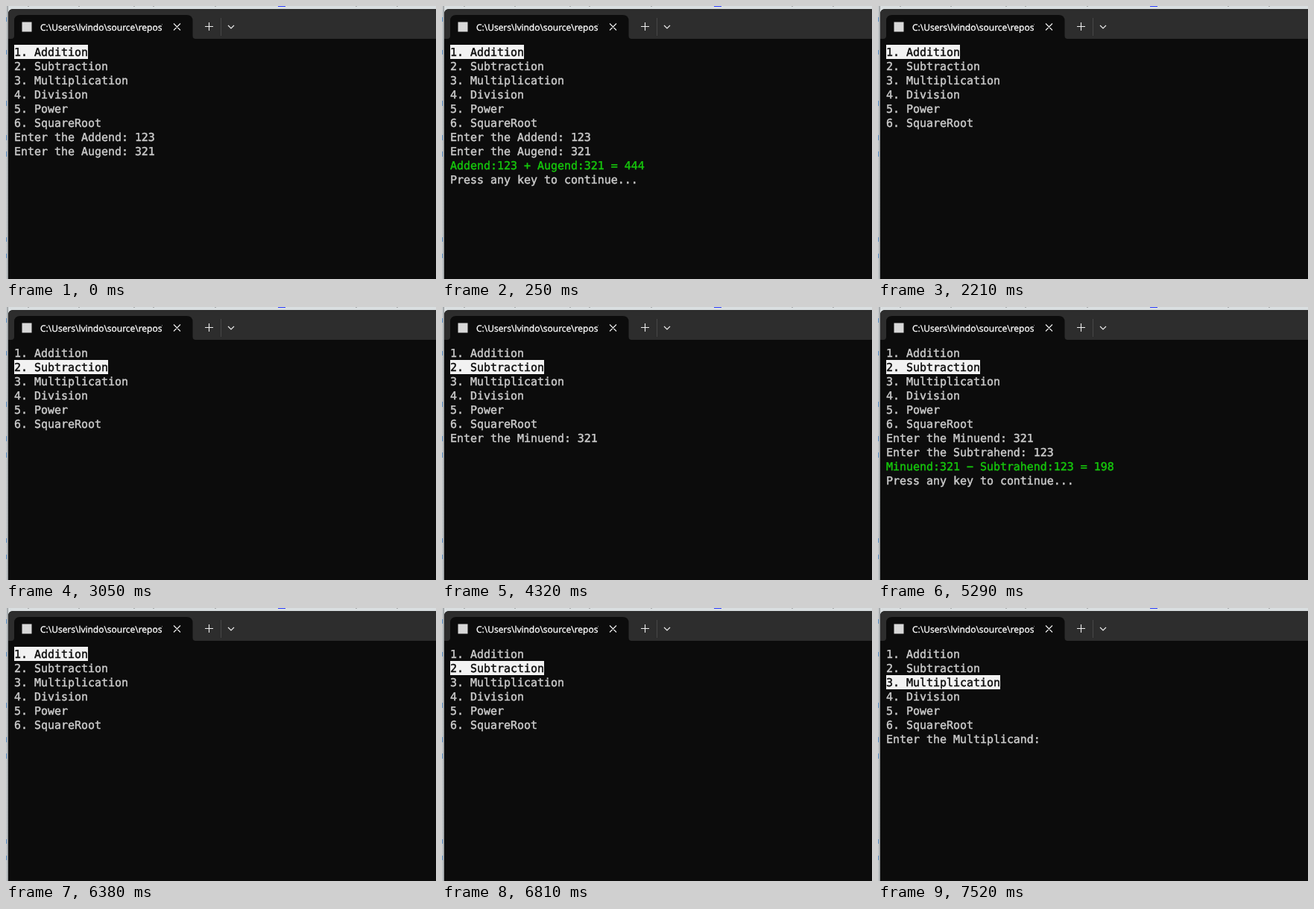
These frames come from a looping animation (577 px wide and 366 px high, 8 s). An HTML page:

```html
<!DOCTYPE html>
<html lang="en">
<head>
<meta charset="utf-8">
<title>Calculator menu</title>
<style>
  html, body { margin: 0; width: 100%; height: 100%; overflow: hidden; background: #0c0c0c; }
  svg { display: block; }
  text { fill: currentColor; stroke: currentColor; stroke-width: .45; text-rendering: geometricPrecision; }
  .title { font: 12px "Open Sans", "Noto Sans", sans-serif; color: #fff; stroke-width: .35; }
  #screen { font: 14.95px "DejaVu Sans Mono", "Noto Sans Mono", monospace; }
  .icon { fill: none; stroke: #eee; stroke-width: 1.1; }
</style>
</head>
<body>
<svg width="577" height="366" viewBox="0 0 577 366">
  <defs>
    <linearGradient id="edge">
      <stop offset="0" stop-color="#d3d7d9"/>
      <stop offset="1" stop-color="#8f9395"/>
    </linearGradient>
    <clipPath id="tabClip"><rect x="44" y="16" width="166" height="24"/></clipPath>
  </defs>

  <!-- page behind the window -->
  <rect width="577" height="12" fill="#d9dee0"/>
  <rect width="3" height="366" fill="url(#edge)"/>
  <path d="M30 0v1M98 0v1M172 0v1M198 0v1M281 0v1M470 0v1M525 0v1" stroke="#777"/>
  <path d="M365 .5h10" stroke="#2a3cff"/>
  <path d="M.5 15v6M.5 59v6M.5 127v7M.5 173v7M.5 195v7M.5 310v6M.5 332v6" stroke="#2f78c4" opacity=".7"/>

  <!-- window and tab -->
  <path d="M3 366V11q0-7 7-7H577V366z" fill="#0c0c0c"/>
  <path d="M3 44V11q0-7 7-7H577V44z" fill="#2d2d2d"/>
  <path d="M7 44q4 0 4-4V20q0-8 8-8H242.5q8 0 8 8V40q0 4 4 4z" fill="#0c0c0c"/>
  <rect x="21.5" y="21.5" width="13" height="13" fill="#d8d8d8"/>
  <text class="title" x="46" y="33" clip-path="url(#tabClip)">C:\Users\lvindo\source\repos\</text>
  <path class="icon" d="M225 23.5l9 9M234 23.5l-9 9M267 27.5h11M272.5 22v11M298 26l4 4 4-4"/>
  <path d="M288.5 16v24" stroke="#484848"/>

  <g id="screen"></g>
</svg>
<script>
const LOOP = 8000, LEFT = 11, TOP = 52, CELL = 9, ROW = 19;
const GREY = "#cccccc", GREEN = "#16c60c", BLACK = "#0c0c0c", WHITE = "#f2f2f2";
const MENU = ["Addition", "Subtraction", "Multiplication", "Division", "Power", "SquareRoot"]
  .map((name, i) => `${i + 1}. ${name}`);

const PRESS = "Press any key to continue...";
const sum = ["Enter the Addend: 123", "Enter the Augend: 321"];
const minuend = "Enter the Minuend: ", subtrahend = "Enter the Subtrahend: ";

// start time, selected menu item, lines below the menu
const STEPS = [
  [0, 0, sum],
  [250, 0, [...sum, "Addend:123 + Augend:321 = 444", PRESS]],
  [2210, 0, []],
  [3050, 1, []],
  [3640, 1, [minuend]],
  [4170, 1, [minuend + "32"]],
  [4320, 1, [minuend + "321"]],
  [4600, 1, [minuend + "321", subtrahend]],
  [4870, 1, [minuend + "321", subtrahend + "12"]],
  [4990, 1, [minuend + "321", subtrahend + "123"]],
  [5290, 1, [minuend + "321", subtrahend + "123", "Minuend:321 − Subtrahend:123 = 198", PRESS]],
  [6380, 0, []],
  [6810, 1, []],
  [6960, 2, []],
  [7520, 2, ["Enter the Multiplicand: "]]
];

const screen = document.getElementById("screen");
let shown = null;

function line(text, row, selected) {
  const y = TOP + row * ROW;
  const color = selected ? BLACK : text.includes("=") ? GREEN : GREY;
  const bar = selected
    ? `<rect x="${LEFT}" y="${y}" width="${text.length * CELL}" height="${ROW}" fill="${WHITE}"/>` : "";
  return `${bar}<text x="${LEFT}" y="${y + 15}" color="${color}">${text}</text>`;
}

function draw(now) {
  const t = now % LOOP;
  const step = STEPS.findLast(([start]) => start <= t);
  if (step !== shown) {
    const [, selected, output] = shown = step;
    screen.innerHTML = [...MENU, ...output].map((text, row) => line(text, row, row === selected)).join("");
  }
}

const start = performance.now();
function tick() {
  draw(performance.now() - start);
  requestAnimationFrame(tick);
}
tick();
</script>
</body>
</html>
```
